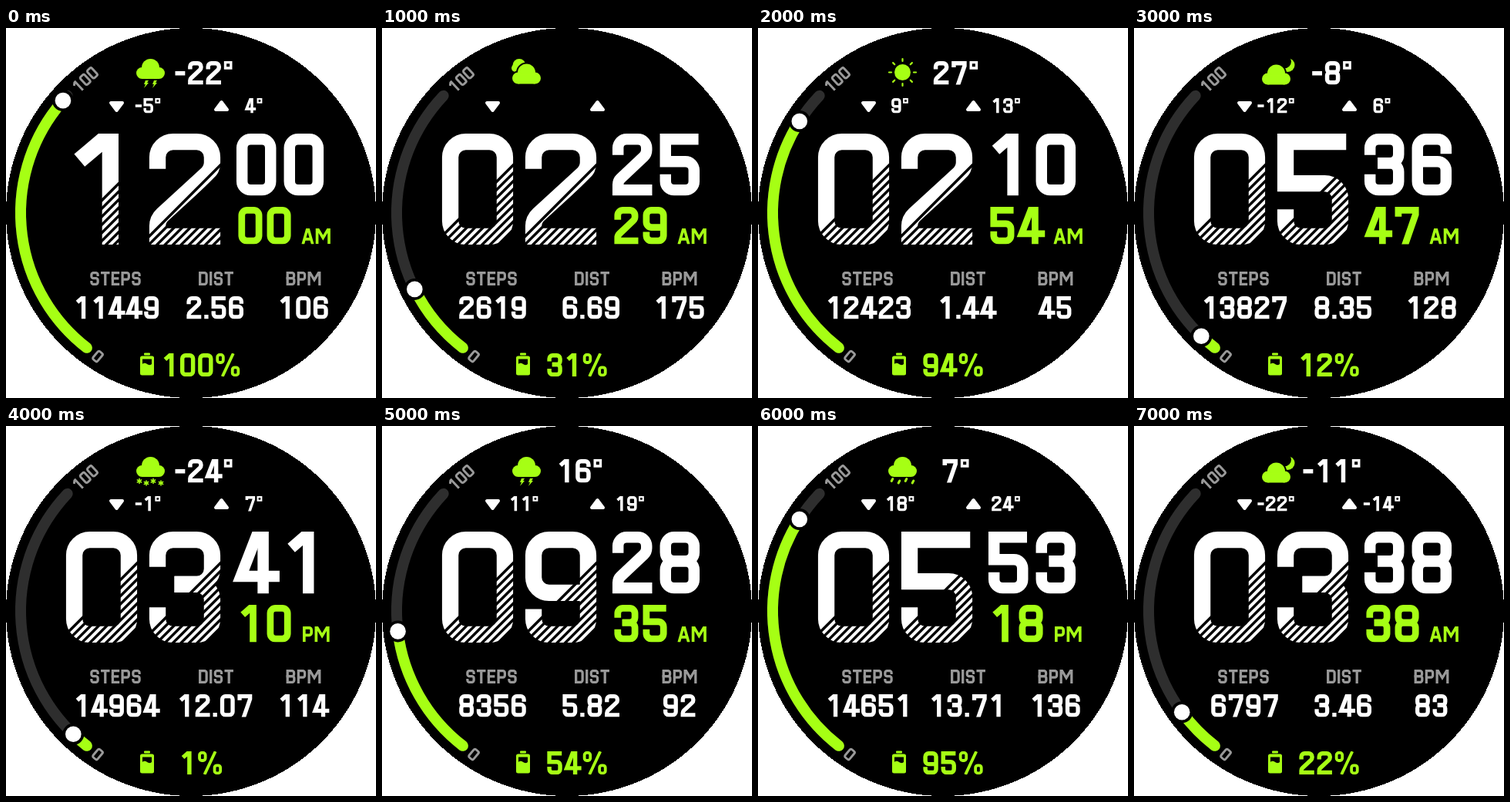
These frames come from a looping animation (480 by 480 pixels, 8 s). An HTML page with a canvas:

```html
<!DOCTYPE html>
<html lang="en">
<head>
<meta charset="utf-8">
<title>Watch face</title>
<style>
  html, body { margin: 0; width: 100%; height: 100%; overflow: hidden; background: #fff; }
  canvas { display: block; width: 480px; height: 480px; }
</style>
</head>
<body>
<canvas id="face" width="480" height="480"></canvas>
<script>
const ctx = document.getElementById('face').getContext('2d');
const LIME = '#a6ff14', WHITE = '#fff', GRAY = '#999', TRACK = '#2e2e2e', BLACK = '#000';
const STEP = 1000;
const rad = deg => deg * Math.PI / 180;

// Squared display face: width (in cap heights), centre lines in percent, stroke factor.
// "r" rounds a corner, "z" closes a rounded loop, "|" separates strokes.
const GLYPHS = {
  0: [.64, '0,0 100,0 100,100 0,100 z'],
  1: [.64, '21,14 66,-8 66,100'],
  2: [.64, '0,20 0,0r 100,0r 100,29r 0,82r 0,100 100,100'],
  3: [.64, '0,20 0,0r 100,0r 100,47r 46,47|46,47 100,47r 100,100r 0,100r 0,80'],
  4: [.64, '52,-4 -4,77 112,77|74,0 74,100'],
  5: [.64, '96,0 0,0 0,44 100,44r 100,100r 0,100r 0,80'],
  6: [.64, '100,18 100,0r 0,0r 0,100r 100,100r 100,44r 8,44'],
  7: [.64, '0,10 0,0 100,0 100,14 42,108'],
  8: [.64, '0,0 100,0 100,47 0,47 z|0,47 100,47 100,100 0,100 z'],
  9: [.64, '0,82 0,100r 100,100r 100,0r 0,0r 0,56r 92,56'],
  '.': [.2, '50,99 50,100'],
  '-': [.42, '0,52 100,52'],
  '°': [.35, '0,0 100,0 100,27 0,27 0,0', .6],
  '%': [1.02, '0,0 28,0 28,38 0,38 z|72,62 100,62 100,100 72,100 z|73,0 27,100', .7],
  S: [.64, '100,18 100,0r 0,0r 0,48r 100,48r 100,100r 0,100r 0,82'],
  T: [.64, '0,0 100,0|50,0 50,100'],
  E: [.58, '100,0 0,0 0,100 100,100|0,49 88,49'],
  P: [.64, '0,100 0,0 100,0r 100,57r 0,57'],
  D: [.65, '0,100 0,0 100,0r 100,100r 0,100'],
  I: [.19, '50,0 50,100'],
  B: [.66, '0,47 0,0 97,0r 97,47r 0,47|0,47 100,47r 100,100r 0,100 0,47'],
  M: [.94, '0,100 0,0 10,0 50,62 90,0 100,0 100,100'],
  A: [.76, '0,104 42,0 58,0 100,104|20,72 80,72']
};
const GAP = .125;

function strokePath(text, w, h, t, radius) {
  const closed = text.endsWith('z');
  const pts = text.replace(' z', '').split(' ').map(p => {
    const [x, y] = p.split(',');
    return {
      x: t / 2 + x / 100 * (w - t),
      y: t / 2 + parseFloat(y) / 100 * (h - t),
      round: closed || y.endsWith('r')
    };
  });
  ctx.beginPath();
  if (closed) ctx.moveTo((pts[0].x + pts[3].x) / 2, (pts[0].y + pts[3].y) / 2);
  pts.forEach((p, i) => {
    const next = pts[i + 1] || (closed && pts[0]);
    if (p.round && next) ctx.arcTo(p.x, p.y, next.x, next.y, radius);
    else ctx.lineTo(p.x, p.y);
  });
  if (closed) ctx.closePath();
  ctx.stroke();
}

function label(value, cx, top, h, color = WHITE, weight = .18) {
  const chars = [...String(value)];
  const total = chars.reduce((sum, c) => sum + GLYPHS[c][0] + GAP, -GAP) * h;
  let x = cx - total / 2;
  for (const c of chars) {
    const [width, strokes, factor = 1] = GLYPHS[c];
    ctx.save();
    ctx.translate(x, top);
    ctx.beginPath();
    ctx.rect(-.2 * h, 0, (width + .4) * h, h);
    ctx.clip();
    ctx.strokeStyle = color;
    ctx.lineWidth = weight * factor * h;
    ctx.lineCap = 'square';
    ctx.lineJoin = 'miter';
    for (const s of strokes.split('|')) strokePath(s, width * h, h, ctx.lineWidth, .14 * factor * h);
    ctx.restore();
    x += (width + GAP) * h;
  }
}

function turnedLabel(value, x, y, h, deg) {
  ctx.save();
  ctx.translate(x, y);
  ctx.rotate(rad(deg));
  label(value, 0, -h / 2, h, GRAY, .18);
  ctx.restore();
}

function disc(x, y, r, color) {
  ctx.fillStyle = color;
  ctx.beginPath();
  ctx.arc(x, y, r, 0, 2 * Math.PI);
  ctx.fill();
}

function box(x, y, w, h, r, color) {
  ctx.fillStyle = color;
  ctx.beginPath();
  ctx.roundRect(x, y, w, h, r);
  ctx.fill();
}

function line(x1, y1, x2, y2, width, color, cap = 'round') {
  ctx.strokeStyle = color;
  ctx.lineWidth = width;
  ctx.lineCap = cap;
  ctx.beginPath();
  ctx.moveTo(x1, y1);
  ctx.lineTo(x2, y2);
  ctx.stroke();
}

function polygon(color, ...pts) {
  ctx.fillStyle = color;
  ctx.beginPath();
  pts.forEach(([x, y]) => ctx.lineTo(x, y));
  ctx.closePath();
  ctx.fill();
}

// Hard-edged round screen, drawn row by row.
function screen() {
  ctx.fillStyle = WHITE;
  ctx.fillRect(0, 0, 480, 480);
  ctx.fillStyle = BLACK;
  for (let y = 0; y < 480; y++) {
    const half = Math.round(Math.sqrt(240 ** 2 - (y - 239.5) ** 2));
    ctx.fillRect(240 - half, y, 2 * half, 1);
  }
}

// Cloud on a base line; grow adds an outline of that width.
function cloud(x, base, color = LIME, grow = 0) {
  disc(x, base - 14.5, 11.5 + grow, color);
  disc(x - 11, base - 7.5, 7.5 + grow, color);
  disc(x + 11, base - 7.5, 7.5 + grow, color);
  box(x - 11 - grow, base - 12 - grow, 22 + 2 * grow, 12 + 2 * grow, 0, color);
}

const ICONS = {
  storm() {
    cloud(187.5, 66);
    for (const x of [179, 190]) {
      polygon(LIME, [x + 2, 68], [x + 6, 68], [x + 4, 71], [x + 6, 71], [x, 78], [x + 2, 73], [x, 73]);
    }
  },
  snow() {
    cloud(187.5, 66);
    [173, 182, 191, 201].forEach((x, i) => {
      const y = i % 2 ? 74 : 71.5;
      for (let a = 30; a < 180; a += 60) {
        const dx = 3 * Math.cos(rad(a)), dy = 3 * Math.sin(rad(a));
        line(x - dx, y - dy, x + dx, y + dy, 1.6, LIME);
      }
    });
  },
  rain() {
    cloud(187.5, 66);
    [174, 183, 192, 201].forEach((x, i) => {
      const y = i % 2 ? 71 : 68.5;
      line(x + .8, y, x - .8, y + 3, 3, LIME);
    });
  },
  sun() {
    disc(187.5, 57.5, 10.5, LIME);
    for (let a = 0; a < 360; a += 45) {
      const c = Math.cos(rad(a)), s = Math.sin(rad(a));
      line(187.5 + 14.5 * c, 57.5 + 14.5 * s, 187.5 + 17.5 * c, 57.5 + 17.5 * s, 2.2, LIME);
    }
  },
  clouds() {
    disc(178, 48.5, 8.5, LIME);
    disc(173, 52, 5, LIME);
    cloud(187.5, 72.5, BLACK, 2);
    cloud(187.5, 72.5);
  },
  night() {
    disc(199.5, 48, 9, LIME);
    disc(195, 43.5, 9, BLACK);
    cloud(184.5, 73.5, BLACK, 2);
    cloud(184.5, 73.5);
  }
};

function hours(text) {
  [...text].forEach((digit, i) => {
    const left = 78 + 108 * i;
    ctx.save();
    ctx.beginPath();
    ctx.rect(left - 4, 136, 101, 147);
    ctx.clip();
    label(digit, left + 46, 137, 144, WHITE, .148);
    for (let y = 178; y < 380; y += 10.5) {
      line(left + 97, y - 5, left - 8, y + 100, 3.4, BLACK, 'butt');
    }
    ctx.restore();
  });
}

function triangle(x, y, dir) {
  ctx.strokeStyle = WHITE;
  ctx.lineWidth = 4;
  ctx.lineJoin = 'round';
  polygon(WHITE, [x - 7.5, y - 5 * dir], [x + 7.5, y - 5 * dir], [x, y + 5 * dir]);
  ctx.stroke();
}

function gauge(percent) {
  const start = 127.7, r = 221;
  const level = Math.max(1, Math.floor(percent / 10));
  const at = Math.min(221.3, 133.7 + 9.86 * (level - 1));
  const arc = (end, color) => {
    ctx.strokeStyle = color;
    ctx.lineWidth = 14;
    ctx.lineCap = 'round';
    ctx.beginPath();
    ctx.arc(240, 240, r, rad(start), rad(end));
    ctx.stroke();
  };
  arc(223.5, TRACK);
  arc(at, LIME);
  const x = 240 + r * Math.cos(rad(at)), y = 240 + r * Math.sin(rad(at));
  disc(x, y, 14, BLACK);
  disc(x, y, 10.3, WHITE);
  turnedLabel('100', 102.7, 67, 16.5, -43);
  turnedLabel('0', 119, 426, 16.5, 40);
}

function battery(percent) {
  box(179, 421.5, 8, 3, 1, LIME);
  box(174, 425.5, 18, 25, 2.5, LIME);
  ctx.fillStyle = BLACK;
  ctx.beginPath();
  ctx.moveTo(177, 429.5);
  ctx.lineTo(189, 429.5);
  ctx.lineTo(189, 436);
  ctx.bezierCurveTo(184, 440, 182, 432, 177, 436);
  ctx.fill();
  label(percent + '%', 253, 422, 30.3, LIME);
}

// icon, temperature, low, high, hour, minute, second, half, steps, distance, pulse, battery
const READINGS = [
  ['storm', -22, -5, 4, '12', '00', '00', 'AM', 11449, '2.56', 106, 100],
  ['clouds', null, null, null, '02', '25', '29', 'AM', 2619, '6.69', 175, 31],
  ['sun', 27, 9, 13, '02', '10', '54', 'AM', 12423, '1.44', 45, 94],
  ['night', -8, -12, 6, '05', '36', '47', 'AM', 13827, '8.35', 128, 12],
  ['snow', -24, -1, 7, '03', '41', '10', 'PM', 14964, '12.07', 114, 1],
  ['storm', 16, 11, 19, '09', '28', '35', 'AM', 8356, '5.82', 92, 54],
  ['rain', 7, 18, 24, '05', '53', '18', 'PM', 14651, '13.71', 136, 95],
  ['night', -11, -22, -14, '03', '38', '38', 'AM', 6797, '3.46', 83, 22]
];

function draw(now) {
  const [icon, temp, low, high, hour, minute, second, half, steps, dist, pulse, charge] =
    READINGS[Math.floor(now / STEP) % READINGS.length];
  screen();
  gauge(charge);
  ICONS[icon]();
  triangle(143.5, 102, 1);
  triangle(279.5, 101, -1);
  if (temp !== null) {
    label(temp + '°', 256.5, 43, 30.5);
    label(low + '°', 184, 91, 19.5);
    label(high + '°', 321.5, 91, 19.5);
  }
  hours(hour);
  label(minute, 355.5, 137, 80.5);
  label(second, 335.5, 232, 48.5, LIME);
  label(half, 402.3, 260, 20.3, LIME, .18);
  label('STEPS', 142, 316, 18, GRAY);
  label('DIST', 272.5, 316, 18, GRAY);
  label('BPM', 386, 316, 18, GRAY);
  label(steps, 143.5, 348, 29.5);
  label(dist, 271.2, 348, 29.5);
  label(pulse, 385.7, 348, 29.5);
  battery(charge);
}

function tick() {
  draw(performance.now());
  requestAnimationFrame(tick);
}
tick();
</script>
</body>
</html>
```
